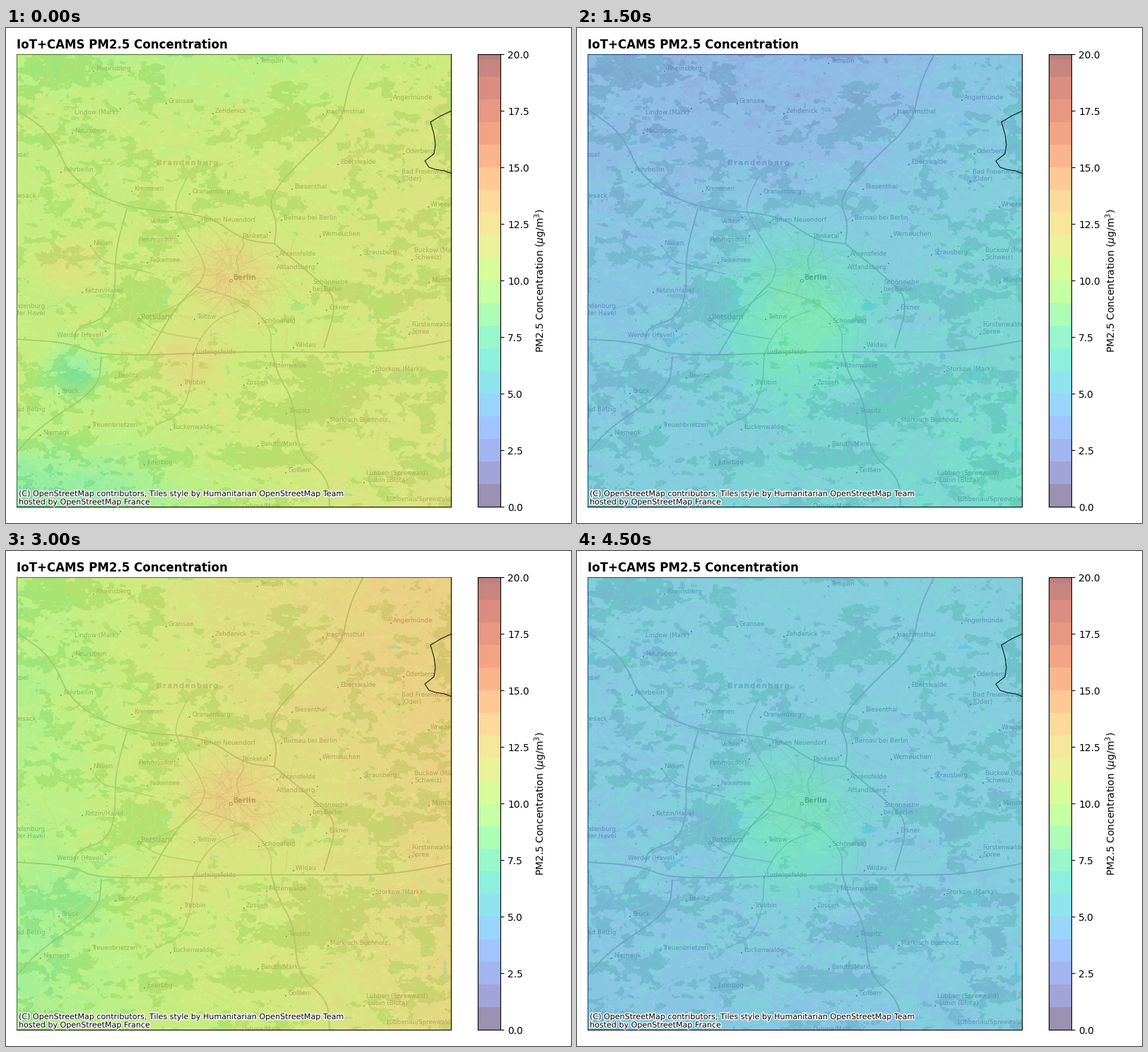
These frames come from a looping animation (800 by 700 pixels, 5000 ms). A matplotlib script:

```python
import numpy as np
import matplotlib.pyplot as plt
from matplotlib import colormaps
from matplotlib.animation import FuncAnimation
from matplotlib.patheffects import withStroke

W, H = 800, 700
L, R, T, B = 15.4, 630.4, 37.2, 677.2
NX, NY = 615, 640
CITY = (318, 350)
turbo = colormaps["turbo"]
plt.rcParams["font.family"] = "DejaVu Sans"
rng = np.random.default_rng(7)
X, Y = np.meshgrid(np.arange(NX) + 15.5, np.arange(NY) + 37.5)


def ease(t):
    return t * t * (3 - 2 * t)


def noise(cx, cy):
    """Smooth value noise with cells of cx by cy pixels."""
    grid = rng.uniform(-1, 1, (int(NY / cy) + 3, int(NX / cx) + 3))
    gx, gy = (X - 15) / cx, (Y - 37) / cy
    ix, iy = gx.astype(int), gy.astype(int)
    fx, fy = ease(gx - ix), ease(gy - iy)
    top = grid[iy, ix] * (1 - fx) + grid[iy, ix + 1] * fx
    low = grid[iy + 1, ix] * (1 - fx) + grid[iy + 1, ix + 1] * fx
    return top * (1 - fy) + low * fy


def bump(x, y, rx, ry):
    return np.exp(-np.hypot((X - x) / rx, (Y - y) / ry) ** 2.6)


def smooth(pts, rounds=3):
    """Round the corners of a polyline."""
    p = np.array(pts, float)
    for _ in range(rounds):
        a = p[:-1] * .75 + p[1:] * .25
        b = p[:-1] * .25 + p[1:] * .75
        p = np.vstack([p[:1], np.stack([a, b], 1).reshape(-1, 2), p[-1:]])
    return p


def wander(x, y, heading, steps, size):
    turns = heading + np.cumsum(rng.normal(0, .3, steps))
    xs = x + np.cumsum(size * np.cos(turns))
    ys = y + np.cumsum(size * np.sin(turns))
    return np.column_stack([xs, ys])


def anywhere():
    return rng.uniform(L, R), rng.uniform(T, B), rng.uniform(0, 2 * np.pi)


# ---- land cover
WOODS = [(395, 135, 65, 42), (75, 75, 55, 32), (330, 238, 65, 16), (190, 182, 28, 20),
         (205, 388, 38, 32), (540, 385, 65, 35), (455, 540, 80, 40), (70, 490, 60, 30),
         (340, 605, 110, 18), (620, 160, 18, 42)]
rough = noise(48, 24) * .32 + noise(20, 11) * .3 + noise(9, 6) * .24 + noise(4, 3) * .16
cover = rough + sum(.5 * bump(*w) for w in WOODS) - .4 * bump(*CITY, 85, 70)
forest = cover > .2
grain = noise(9, 6) * .6 + noise(3, 2) * .4

base = np.empty((NY, NX, 3))
base[:] = (219, 226, 204)
base[grain > .42] = (227, 232, 213)
base[forest] = (181, 203, 169)
base[forest & (grain > .45)] = (192, 212, 180)
base[bump(*CITY, 75, 60) > .5] += (3, -6, -2)

# ---- roads
MOTORWAYS = [
    [(15, 115), (65, 150), (92, 215), (170, 256), (285, 263), (335, 300), (380, 305)],
    [(171, 256), (154, 318), (155, 375), (142, 410), (100, 424), (97, 440)],
    [(15, 440), (90, 445), (135, 465), (345, 457), (500, 459), (560, 455), (630, 442)],
    [(135, 465), (131, 510), (50, 562), (15, 600)],
    [(380, 305), (384, 275), (370, 240), (420, 185), (475, 135), (485, 80), (505, 38)],
    [(375, 455), (385, 490), (408, 530), (413, 600), (456, 635), (458, 677)],
    [(380, 305), (440, 355), (470, 385), (450, 452)],
    [(200, 463), (240, 395), (276, 358)],
]
MAIN = [
    [(276, 358), (285, 335), (240, 265), (241, 242), (257, 210)],
    [(270, 366), (340, 386), (376, 425), (375, 455)],
    [(120, 308), (137, 331), (155, 334), (210, 348)],
    [(265, 462), (263, 505), (248, 545), (212, 562)],
    [(265, 462), (276, 436), (300, 410), (330, 400)],
    [(190, 412), (213, 430), (276, 440)],
    [(190, 412), (234, 398), (270, 372)],
    [(335, 298), (337, 310), (325, 325), (330, 345)],
]
motorways = [smooth(p) for p in MOTORWAYS]
main = [smooth(p) for p in MAIN]
streets = [wander(*CITY, a, rng.integers(5, 14), 8) for a in np.linspace(0, 6.2, 18)]
streets += [wander(rng.normal(320, 40), rng.normal(355, 32), anywhere()[2], 6, 6)
            for _ in range(60)]
lanes = [wander(*anywhere(), 10, 10) for _ in range(70)]

traffic = np.zeros((NY, NX))
for road in motorways + main + streets:
    for (x0, y0), (x1, y1) in zip(road[:-1], road[1:]):
        t = np.linspace(0, 1, 14)
        col = np.clip(x0 + (x1 - x0) * t - 15, 0, NX - 1).astype(int)
        row = np.clip(y0 + (y1 - y0) * t - 37, 0, NY - 1).astype(int)
        traffic[row, col] = 1

# ---- water: start, heading, steps, width
LAKES = [(235, 368, 1.8, 7, 3), (152, 430, 2.2, 7, 3), (402, 395, 0, 5, 5),
         (538, 135, 1, 5, 3), (103, 165, .9, 11, 1.3), (565, 478, 2.1, 8, 2.4),
         (622, 578, 1.9, 7, 3), (90, 378, 2.7, 15, 1)]
LAKES += [(*anywhere(), rng.integers(2, 5), rng.uniform(1, 2.6)) for _ in range(25)]

# ---- labels, by the point they start from
TOWNS = [
    ("Rheinsberg", 127, 57), ("Templin", 359, 46), ("Gransee", 230, 103),
    ("Zehdenick", 296, 117), ("Joachimsthal", 452, 118), ("Angermünde", 548, 98),
    ("Neuruppin", 97, 145), ("Oderberg", 566, 174), ("Eberswalde", 473, 189),
    ("Fehrbellin", 81, 200), ("Kremmen", 181, 227), ("Oranienburg", 263, 231),
    ("Biesenthal", 408, 224), ("Wriezen", 601, 249), ("Hohen Neuendorf", 276, 271),
    ("Bernau bei Berlin", 393, 268), ("Werneuchen", 448, 291), ("Nauen", 123, 304),
    ("Falkensee", 203, 328), ("Ahrensfelde", 387, 319), ("Strausberg", 505, 317),
    ("Müncheberg", 602, 356), ("Ketzin/Havel", 111, 370), ("Erkner", 457, 395),
    ("Teltow", 270, 408), ("Schönefeld", 361, 414), ("Wildau", 410, 448),
    ("Ludwigsfelde", 268, 458), ("Mittenwalde", 372, 477), ("Storkow (Mark)", 523, 482),
    ("Beelitz", 158, 491), ("Trebbin", 251, 501), ("Zossen", 340, 501),
    ("Brück", 78, 513), ("Teupitz", 400, 541), ("Märkisch Buchholz", 459, 554),
    ("Treuenbrietzen", 121, 561), ("Luckenwalde", 236, 564), ("Niemegk", 52, 572),
    ("Baruth/Mark", 360, 587), ("Jüterbog", 199, 614), ("Golßen", 399, 625),
    ("Bad Freienwalde\n(Oder)", 560, 203), ("Buckow (Märkische\nSchweiz)", 578, 314),
    ("Schöneiche\nbei Berlin", 434, 359), ("Fürstenwalde\nSpree", 574, 419),
    ("Lübben (Spreewald)\n Lubin (Błota)", 510, 629),
]
LEFT = [("Lindow (Mark)", 162, 114), ("Velten", 234, 268), ("Panketal", 374, 289),
        ("Hennigsdorf", 244, 294), ("Altlandsberg", 441, 333), ("Werder (Havel)", 141, 429)]
CUT = [("ssel", 15, 179), ("iesack", 15, 237), ("ndenburg\nder Havel", 13, 393),
       ("ad Belzig", 15, 539), ("Lübbenau/Spreewald", 538, 666), ("Dahme/Mark", 333, 675)]

# ---- concentration: (mean, eastward, southward) trend, then local bumps
HOURS = {
    0: ((11, .6, .1), (*CITY, 65, 58, 1.4), (255, 470, 50, 45, 1.3), (90, 330, 50, 40, 1.3),
        (95, 485, 45, 40, -2.2), (60, 690, 250, 110, -2.6), (330, 38, 350, 70, -1)),
    2: ((3.6, .2, .5), (310, 400, 98, 115, 2.8), (610, 610, 120, 110, .6)),
    4: ((6.2, .7, .5), (315, 420, 95, 110, 1.6), (330, 60, 260, 190, -1.7)),
    5: ((11.1, 1.7, .4), (*CITY, 65, 55, 1), (40, 150, 150, 160, -1.1),
        (95, 475, 55, 40, -1.3)),
    7: ((11.6, 1.4, -1.4), (*CITY, 75, 65, 1.7), (380, 180, 220, 140, .7),
        (40, 540, 110, 120, -1.2), (260, 465, 55, 40, 1.3)),
    8: ((6.9, .1, -.9), (320, 365, 90, 95, .9), (230, 45, 90, 50, .6), (610, 50, 80, 50, .7)),
    9: ((4.8, .1, -.2), (310, 385, 92, 98, 1.8)),
}
texture = noise(30, 20) * .25 + noise(8, 6) * .22 + noise(2, 2) * .14 - .15 * forest
texture += traffic * (.15 + .3 * bump(*CITY, 90, 80))


def hour(trend, *bumps):
    mean, east, south = trend
    v = mean + east * (X - 322) / 308 + south * (Y - 357) / 320
    return v + sum(amp * bump(*where) for *where, amp in bumps)


fields = {k: hour(*spec) for k, spec in HOURS.items()}
for k in set(range(10)) - set(HOURS):
    fields[k] = (fields[k - 1] + fields[k + 1]) / 2
STEP = .55
shades = [turbo(np.round((fields[k] + texture) / STEP) * STEP / 20)[..., :3]
          for k in range(10)]

# ---- stage
fig = plt.figure(figsize=(W / 100, H / 100), dpi=100, facecolor="white")


def panel(l, r):
    return fig.add_axes([l / W, 1 - B / H, (r - l) / W, (B - T) / H])


ax = panel(L, R)
ax.set(xlim=(L, R), ylim=(B, T), xticks=[], yticks=[])
ax.set_title("IoT+CAMS PM2.5 Concentration", loc="left", fontsize=12, fontweight="bold")
box = dict(extent=(L, R, B, T), aspect="auto", interpolation="nearest")
ax.imshow(np.clip(base / 255, 0, 1), zorder=0, **box)


def lines(paths, color, width):
    for p in paths:
        ax.plot(p[:, 0], p[:, 1], color=color, lw=width, zorder=1,
                solid_capstyle="round", solid_joinstyle="round")


for x, y, heading, steps, width in LAKES:
    lines([wander(x, y, heading, steps, 4)], "#9bd6dc", width)
lines(lanes, "#d3d5c4", .6)
lines(streets, "#c9c2b4", .6)
lines(main, "#aaa599", .9)
lines(motorways, "#a5a097", 1.3)

INK = "#82767a"


def label(s, x, y, size=6.3, **kw):
    """Write rows of text, the first centred on y."""
    for i, row in enumerate(s.split("\n")):
        ax.text(x, y + 10 * i, row, fontsize=size, va="center_baseline",
                clip_on=True, zorder=2, **{"color": INK, **kw})


def dot(x, y):
    ax.plot(x, y, "s", ms=1.5, color="#74686c", mew=0, zorder=2)


for name, x, y in TOWNS:
    label(name, x, y)
    dot(x - 3, y + 4 + 10 * name.count("\n"))
for name, x, y in LEFT:
    label(name, x - 3, y + 5, ha="right")
    dot(x, y)
for cut in CUT:
    label(*cut)
label("\u200a".join("Brandenburg"), 213, 190, 7.6, weight="bold", color="#a3989a")
label("Berlin", 321, 352, 7, weight="bold")
label("Potsdam", 191, 408, 7.4)
ax.plot([318, 188], [357, 412], "o", ms=3, mfc="none", mec=INK, mew=.8, zorder=2)

overlay = ax.imshow(shades[0], alpha=.5, zorder=3, **box)
border = [(631, 117), (616, 124), (601, 133), (606, 150), (608, 165), (606, 178),
          (593, 188), (599, 197), (608, 200), (621, 202), (631, 206)]
ax.plot(*np.transpose(border), color="black", lw=.7, zorder=4)

CREDIT = ["(C) OpenStreetMap contributors, Tiles style by Humanitarian OpenStreetMap Team",
          "hosted by OpenStreetMap France"]
for i, row in enumerate(CREDIT):
    ax.text(18, 662 + 11.7 * i, row, fontsize=8, zorder=5,
            path_effects=[withStroke(linewidth=2, foreground="white")])

# ---- colour bar in unit bands
bar = panel(668.4, 700.4)
for v in range(20):
    bar.axhspan(v, v + 1, color=np.array(turbo((v + .5) / 20)[:3]) * .5 + .5, lw=0)
bar.axhspan(19.77, 20, color="#b98180", lw=0)
bar.set(xlim=(0, 1), ylim=(0, 20), xticks=[], yticks=np.arange(0, 20.1, 2.5))
bar.yaxis.tick_right()
bar.yaxis.set_label_position("right")
bar.set_ylabel(r"PM2.5 Concentration ($\mu$g/m$^3$)")


def draw(i):
    overlay.set_data(shades[i])
    return [overlay]


anim = FuncAnimation(fig, draw, frames=10, interval=500, repeat=True, repeat_delay=0)
plt.show()
```
